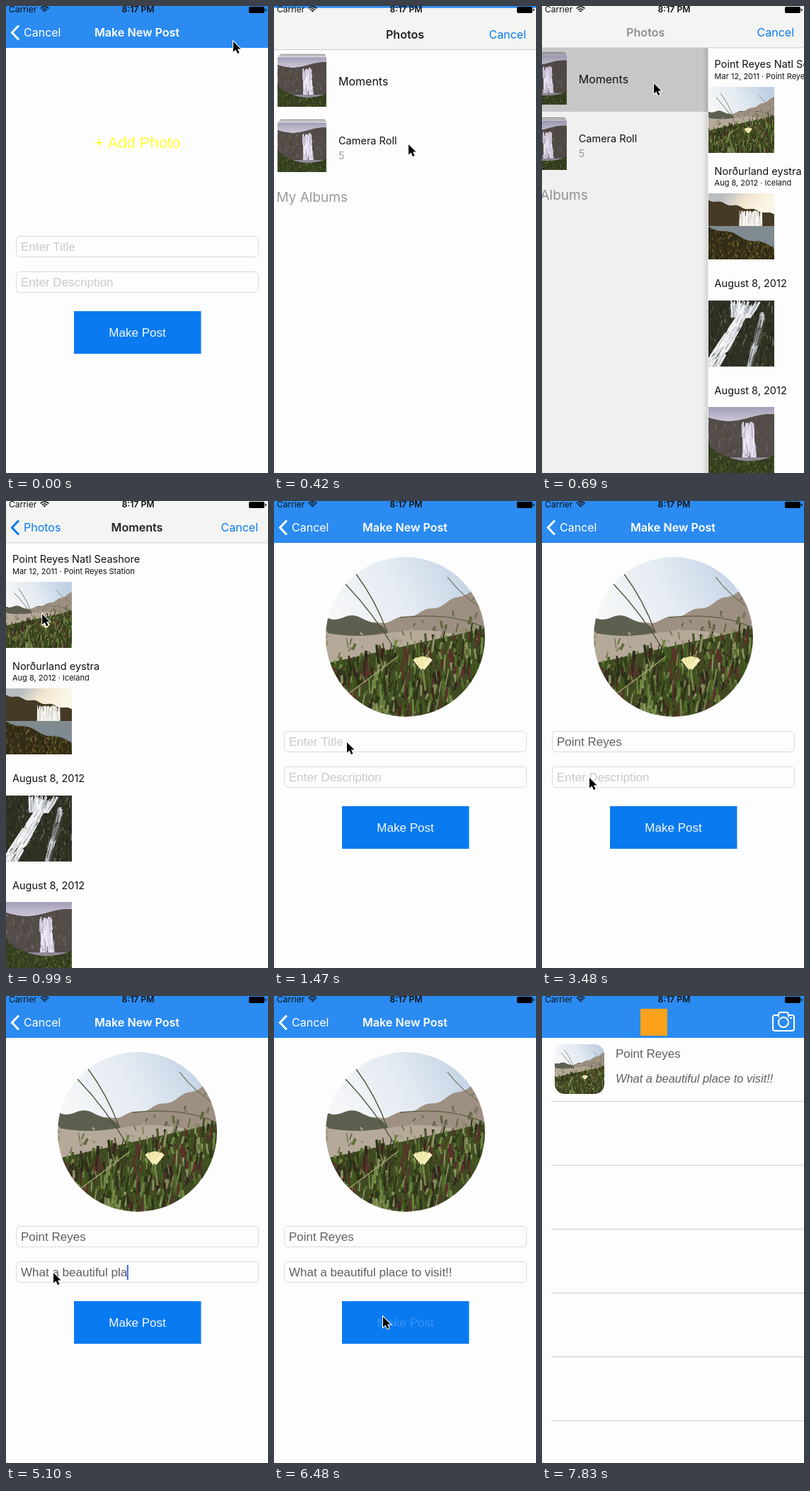
These frames come from a looping animation (370x658 px, 7980 ms). An HTML page with a canvas:

```html
<!DOCTYPE html>
<html lang="en">
<head>
<meta charset="utf-8">
<title>Make New Post</title>
<style>
  html, body { margin: 0; width: 100%; height: 100%; overflow: hidden; background: #fdfdfd; }
  canvas { display: block; }
</style>
</head>
<body>
<canvas id="stage" width="370" height="658"></canvas>
<script>
const W = 370, H = 658, BAR = 59, LOOP = 7980;
const PAPER = '#fdfdfd', BLUE = '#2b8bf1', LINK = '#087cf2', INK = '#606062', PALE = '#c9c9cf';
const UI = 'Inter, sans-serif', HELV = '"Liberation Sans", Arial, sans-serif';
const TITLE = 'Point Reyes', DESCRIPTION = 'What a beautiful place to visit!!';
const ctx = document.getElementById('stage').getContext('2d');

const clamp = v => Math.max(0, Math.min(1, v));
const progress = (t, start, end) => clamp((t - start) / (end - start));
const easeOut = p => 1 - (1 - p) ** 3;
const smooth = p => p * p * (3 - 2 * p);
const mix = (a, b, p) => a + (b - a) * p;

function randomizer(seed) {
  return () => (seed = (seed * 16807) % 2147483647) / 2147483647;
}

function rect(color, x, y, w, h) {
  ctx.fillStyle = color;
  ctx.fillRect(x, y, w, h);
}

function roundRect(x, y, w, h, r) {
  ctx.beginPath();
  ctx.roundRect(x, y, w, h, r);
}

// y is the vertical middle of the text's capitals.
function text(str, x, y, size, color, { font = UI, style = '', align = 'left' } = {}) {
  ctx.font = `${style} ${size}px ${font}`;
  ctx.textAlign = align;
  ctx.fillStyle = color;
  ctx.fillText(str, x, y + size * 0.36);
}

function faded(alpha, draw) {
  if (alpha <= 0) return;
  ctx.save();
  ctx.globalAlpha = Math.min(1, alpha);
  draw();
  ctx.restore();
}

function shifted(x, y, draw) {
  ctx.save();
  ctx.translate(x, y);
  draw();
  ctx.restore();
}

function gradient(g, x0, y0, x1, y1, ...colors) {
  const fill = g.createLinearGradient(x0, y0, x1, y1);
  colors.forEach((c, i) => fill.addColorStop(i / (colors.length - 1), c));
  return fill;
}

// ---- Pictures, each painted once on a square ----
const SIDE = 225;

function picture(paint) {
  const canvas = document.createElement('canvas');
  canvas.width = canvas.height = SIDE;
  paint(canvas.getContext('2d'));
  return canvas;
}

function ground(g, color, top) {
  g.fillStyle = color;
  g.beginPath();
  g.moveTo(0, SIDE);
  for (let x = 0; x <= SIDE; x += 3) g.lineTo(x, top(x));
  g.lineTo(SIDE, SIDE);
  g.fill();
}

function stroke(g, color, width, x0, y0, x1, y1, bend = 0) {
  g.strokeStyle = color;
  g.lineWidth = width;
  g.beginPath();
  g.moveTo(x0, y0);
  g.quadraticCurveTo((x0 + x1) / 2 + bend, (y0 + y1) / 2 - bend, x1, y1);
  g.stroke();
}

// Scatters short strokes from the edge `top` down to the bottom.
function tufts(g, seed, count, top, length, colors) {
  const rnd = randomizer(seed);
  for (let i = 0; i < count; i++) {
    const x = rnd() * SIDE, y = mix(top(x), SIDE + 10, i / count);
    const color = colors[Math.floor(rnd() * colors.length)];
    stroke(g, color, 1 + rnd() * 3, x, y + length * rnd(), x + (rnd() - 0.4) * 9, y - length * rnd());
  }
}

// Streaks of water around center(y), half(y) wide on each side.
function falls(g, seed, top, bottom, center, half, colors) {
  const rnd = randomizer(seed);
  for (let i = 0; i < 160; i++) {
    const y = mix(top, bottom, rnd()), end = Math.min(bottom, y + 40), side = rnd() * 2 - 1;
    stroke(g, colors[i % colors.length], 2 + rnd() * 4,
      center(y) + side * half(y), y, center(end) + side * half(end), end);
  }
}

const meadow = picture(g => {
  g.fillStyle = gradient(g, 20, 90, 200, 0, '#f6f7f8', '#e3eaf2', '#bfd0e3');
  g.fillRect(0, 0, SIDE, SIDE);
  const dune = x => 98 - 62 * (x / SIDE) ** 2.2 + 2 * Math.sin(x / 6);
  const grass = x => 150 - 0.22 * x;
  ground(g, '#9d9082', dune);
  ground(g, '#5d6050', x => 85 + 3 * Math.sin(x / 8) + 14 * (x / 80) ** 6);
  tufts(g, 5, 140, x => dune(x) + 8, 5, ['#7d7563', '#686650', '#b0a392', '#5d5f48']);
  ground(g, '#b5a999', x => 107 + 4 * Math.sin(x / 28));
  tufts(g, 9, 80, x => 114, 4, ['#a2977f', '#8b8468', '#c3b8a8']);
  tufts(g, 3, 70, x => grass(x) - 25, 10, ['#5f6a3c', '#7c7c50', '#6b5d42']);
  ground(g, '#3f4a22', grass);
  tufts(g, 7, 620, grass, 15,
    ['#2c3a18', '#506a2a', '#6f8743', '#28301a', '#5e2f2c', '#8a9160', '#42581f', '#3a2620']);
  for (const i of [0, 1]) stroke(g, '#4c5236', 1.3, 43 - 15 * i, 24 + 14 * i, 87 + 13 * i, 106 + 28 * i, 5);
  stroke(g, '#5b6040', 1.4, 105, 85, SIDE, 100, 15);
  stroke(g, '#66694c', 1.2, 172, 28, SIDE, 75, -5);
  stroke(g, '#a39f6c', 1.5, 30, 194, 102, 140, -3);
  stroke(g, '#76854a', 3, 137, 158, 141, 188);
  for (let i = -3; i <= 3; i++) stroke(g, i % 2 ? '#f6efba' : '#ece2a0', 6, 137, 157, 137 + i * 3.8, 140 + Math.abs(i));
});

const shore = picture(g => {
  g.fillStyle = gradient(g, 60, 0, 160, 80, '#b9bdc2', '#f3e6cf', '#fbf5e6');
  g.fillRect(0, 0, SIDE, SIDE);
  ground(g, '#453a26', x => 22 + x * 0.22 + 3 * Math.sin(x / 9));
  falls(g, 13, 58, 112, () => 145, () => 38, ['#f3f1ec', '#ddd9d3', '#fbf9f5']);
  ground(g, '#7f8b90', () => 112);
  const bank = x => 112 + 0.32 * x + 5 * Math.sin(x / 17);
  ground(g, '#332d17', bank);
  tufts(g, 21, 260, bank, 8, ['#6b682c', '#231d10', '#7d6230', '#46511f', '#674523']);
});

const cascade = picture(g => {
  ground(g, '#2e3024', () => 0);
  tufts(g, 31, 300, () => 0, 12, ['#4a5534', '#1d1e18', '#6c6e5c', '#34401f']);
  falls(g, 17, 0, 60, y => 130 - y * 0.3, y => 55 - y * 0.4, ['#e4e6ea', '#b9bdc2', '#f4f5f7']);
  falls(g, 19, 45, SIDE, y => 150 - y * 0.62, y => 14 + y * 0.06, ['#eceef1', '#c6cacf', '#f8f8fa']);
  falls(g, 23, 40, SIDE, y => 200 - y * 0.26, () => 9, ['#8d9192', '#c9cccf', '#4d5148']);
});

const valley = picture(g => {
  g.fillStyle = gradient(g, 0, 0, 0, 60, '#a49fb8', '#d5d0df');
  g.fillRect(0, 0, SIDE, SIDE);
  const cliff = x => 36 + 12 * Math.sin(x / 45);
  ground(g, '#544c48', cliff);
  tufts(g, 37, 200, x => cliff(x) + 8, 10, ['#6c625c', '#443f39', '#4a5233', '#7a7079']);
  falls(g, 29, 50, 172, y => 132 + y * 0.05, y => 17 + y * 0.04, ['#ded7ea', '#c3bad2', '#efeaf5']);
  ground(g, '#8f8a98', () => 172);
  const bank = x => 184 - 50 * ((x - 140) / 140) ** 2;
  ground(g, '#34401f', bank);
  tufts(g, 41, 200, bank, 8, ['#55682f', '#273018', '#64703d', '#45422c']);
});

const moments = [
  ['Point Reyes Natl Seashore', 'Mar 12, 2011 · Point Reyes Station', meadow],
  ['Norðurland eystra', 'Aug 8, 2012 · Iceland', shore],
  ['August 8, 2012', '', cascade],
  ['August 8, 2012', '', valley],
];

// ---- Interface parts ----
function statusBar() {
  text('Carrier', 4, 5, 12, '#111');
  text('8:17 PM', 186.5, 5, 12.2, '#111', { style: '600', align: 'center' });
  ctx.strokeStyle = '#111';
  ctx.lineWidth = 1.7;
  for (let r = 2; r < 9; r += 3) {
    ctx.beginPath();
    ctx.arc(54.5, 9, r, -Math.PI * 0.76, -Math.PI * 0.24);
    ctx.stroke();
  }
  ctx.fillStyle = '#000';
  roundRect(343, 1, 22, 9, 2);
  ctx.fill();
  ctx.fillRect(366, 4, 1.5, 3);
}

function backButton(label, color) {
  ctx.strokeStyle = color;
  ctx.lineWidth = 3;
  ctx.beginPath();
  for (const i of [-1, 0, 1]) ctx.lineTo(8.5 + 9.5 * Math.abs(i), 37.5 + 10 * i);
  ctx.stroke();
  text(label, 25, 37, 16, color);
}

function navTitle(label, x, color) {
  text(label, x, 37, 16.1, color, { style: '600', align: 'center' });
}

function formNav() {
  backButton('Cancel', '#fff');
  navTitle('Make New Post', 185, '#fff');
}

function listNav() {
  rect('#fba11c', 139, 18, 38, 38);
  ctx.strokeStyle = '#fff';
  ctx.lineWidth = 2;
  roundRect(326, 27, 30, 22, 3);
  ctx.stroke();
  rect(BLUE, 334, 25, 14, 4);
  roundRect(334, 23, 14, 6, [3, 3, 0, 0]);
  ctx.stroke();
  rect(BLUE, 335, 26, 12, 4);
  ctx.beginPath();
  ctx.arc(341, 37, 7, 0, 7);
  ctx.stroke();
  rect('#fff', 350, 30, 3, 2);
}

function field(y, value, placeholder, caret) {
  ctx.strokeStyle = '#dadade';
  ctx.lineWidth = 1;
  roundRect(14.5, y + 0.5, 342, 29, 5);
  ctx.stroke();
  text(value || placeholder, 21, y + 15, 17, value ? INK : PALE, { font: HELV });
  const end = value ? 21 + ctx.measureText(value).width : 21;
  faded(caret, () => rect('#4060e0', end - 0.5, y + 5, 2, 21));
}

const typed = (str, t, start, step) => str.slice(0, Math.max(0, Math.floor((t - start) / step) + 1));

// Solid while typing, pulsing while the field only has the focus.
function caretAlpha(t, focus, typing, pause, blur) {
  if (t < focus || t > blur) return 0;
  return t > typing && t < pause ? 1 : clamp(0.5 + Math.cos((t - focus) * Math.PI / 250));
}

function form(t) {
  rect(PAPER, 0, BAR, W, H - BAR);
  if (t < 1040) {
    const pressed = t > 215 && t < 330;
    text('+ Add Photo', 185.5, 192, 22, pressed ? '#ffffb0' : '#ffff38', { font: HELV, align: 'center' });
  } else {
    ctx.save();
    roundRect(73, 79, SIDE, SIDE, SIDE / 2);
    ctx.clip();
    ctx.drawImage(meadow, 73, 79);
    ctx.restore();
  }
  field(324, typed(TITLE, t, 2430, 62), 'Enter Title', caretAlpha(t, 1740, 2430, 3100, 3440));
  field(374, typed(DESCRIPTION, t, 4290, 42), 'Enter Description', caretAlpha(t, 3520, 4290, 5700, 6400));
  rect('#0a7af0', 96, 430, 179.5, 60);
  text('Make Post', 185.5, 460, 17, t > 6440 ? '#3b92f6' : '#f4f9ff', { font: HELV, align: 'center' });
}

function list() {
  rect(PAPER, 0, BAR, W, H - BAR);
  for (let y = 148; y < 600; y += 90) rect('#cdcdd0', 13, y, W - 13, 1);
  ctx.save();
  roundRect(18, 68, 70, 70, 14);
  ctx.clip();
  ctx.drawImage(meadow, 18, 68, 70, 70);
  ctx.restore();
  text(TITLE, 104, 80.5, 17, INK, { font: HELV });
  text(DESCRIPTION, 104, 116.5, 16.4, INK, { font: HELV, style: 'italic' });
}

function album(y, name, count) {
  for (const i of [0, 1]) rect('#77777c', 9 - 2 * i, y + 6 + 2 * i, 63 + 3 * i, 1);
  ctx.drawImage(valley, 5, y + 10, 69, 70);
  text(name, 91, y + (count ? 36 : 44), count ? 14.5 : 16, '#111');
  if (count) text(count, 91, y + 57, 14.5, '#a0a0a2');
}

function albums(selected) {
  rect(PAPER, 0, BAR, W, H - BAR);
  if (selected) rect('#d2d2d3', 0, BAR, W, 90);
  album(59, 'Moments');
  album(151, 'Camera Roll', '5');
  text('My Albums', 104, 266, 19, '#9a9a9e', { align: 'right' });
}

function momentPage() {
  rect(PAPER, 0, BAR, W, H - BAR);
  moments.forEach(([title, place, photo], i) => {
    const y = 82 + i * 150.5;
    text(title, 9, place ? y : y + 8, 14.5, '#111');
    text(place, 9, y + 17, 11, '#111');
    ctx.drawImage(photo, 0, y + 31.5, 93, 93);
  });
}

function picker(t) {
  const push = easeOut(progress(t, 660, 880));
  const edge = W * (1 - push);
  shifted(-0.29 * W * push, 0, () => albums(t > 570));
  if (push > 0) {
    rect(`rgba(0, 0, 0, ${0.05 * Math.min(1, push * 3)})`, 0, BAR, edge, H - BAR);
    rect(gradient(ctx, edge - 8, 0, edge, 0, 'rgba(0,0,0,0)', 'rgba(0,0,0,.14)'), edge - 8, BAR, 8, H - BAR);
    shifted(edge, 0, momentPage);
  }
  rect('#f4f4f2', 0, 0, W, BAR);
  rect('#c4c4c6', 0, BAR - 0.5, W, 0.8);
  faded(1 - push * 1.4, () => navTitle('Photos', 185 - 106 * push, '#222'));
  faded(push * 2 - 0.75, () => {
    backButton('Photos', LINK);
    navTitle('Moments', 185 + 185 * (1 - push), '#222');
  });
  text('Cancel', 356, 37, 16, LINK, { align: 'right' });
}

// Each move of the pointer ends on the thing that is tapped next.
const moves = [
  { start: 30, end: 210, x: 190, y: 195 },
  { start: 420, end: 570, x: 158, y: 109 },
  { start: 850, end: 1000, x: 50, y: 160 },
  { start: 1200, end: 1440, x: 103, y: 340 },
  { start: 3090, end: 3330, x: 67, y: 390 },
  { start: 5970, end: 6390, x: 154, y: 452 },
];

function pointer(t) {
  if (t > 7170) return;
  let x = 321, y = 50;
  for (const move of moves) {
    const p = smooth(progress(t, move.start, move.end));
    x = mix(x, move.x, p);
    y = mix(y, move.y, p);
  }
  shifted(x, y, () => {
    const arrow = new Path2D('M0 0V14.5L3.5 11.5 6 17 8.5 16 6 10.5H10.5Z');
    ctx.strokeStyle = '#fff';
    ctx.lineWidth = 2;
    ctx.stroke(arrow);
    ctx.fillStyle = '#000';
    ctx.fill(arrow);
  });
}

function render(t) {
  rect(PAPER, 0, 0, W, H);
  const pop = easeOut(progress(t, 6735, 7020));
  if (pop > 0) shifted(-0.3 * W * (1 - pop), 0, list);
  if (pop < 1) shifted(W * pop, 0, () => form(t));
  rect(BLUE, 0, 0, W, BAR);
  faded(1 - pop, formNav);
  faded(pop, listNav);

  if (t > 270 && t < 1330) {
    const rise = 1 - easeOut(progress(t, 270, 450));
    const fall = smooth(progress(t, 1080, 1330));
    shifted(0, H * (rise + fall), () => picker(t));
  }
  statusBar();
  pointer(t);
}

const started = performance.now();
function tick() {
  render((performance.now() - started) % LOOP);
  requestAnimationFrame(tick);
}
tick();
</script>
</body>
</html>
```
